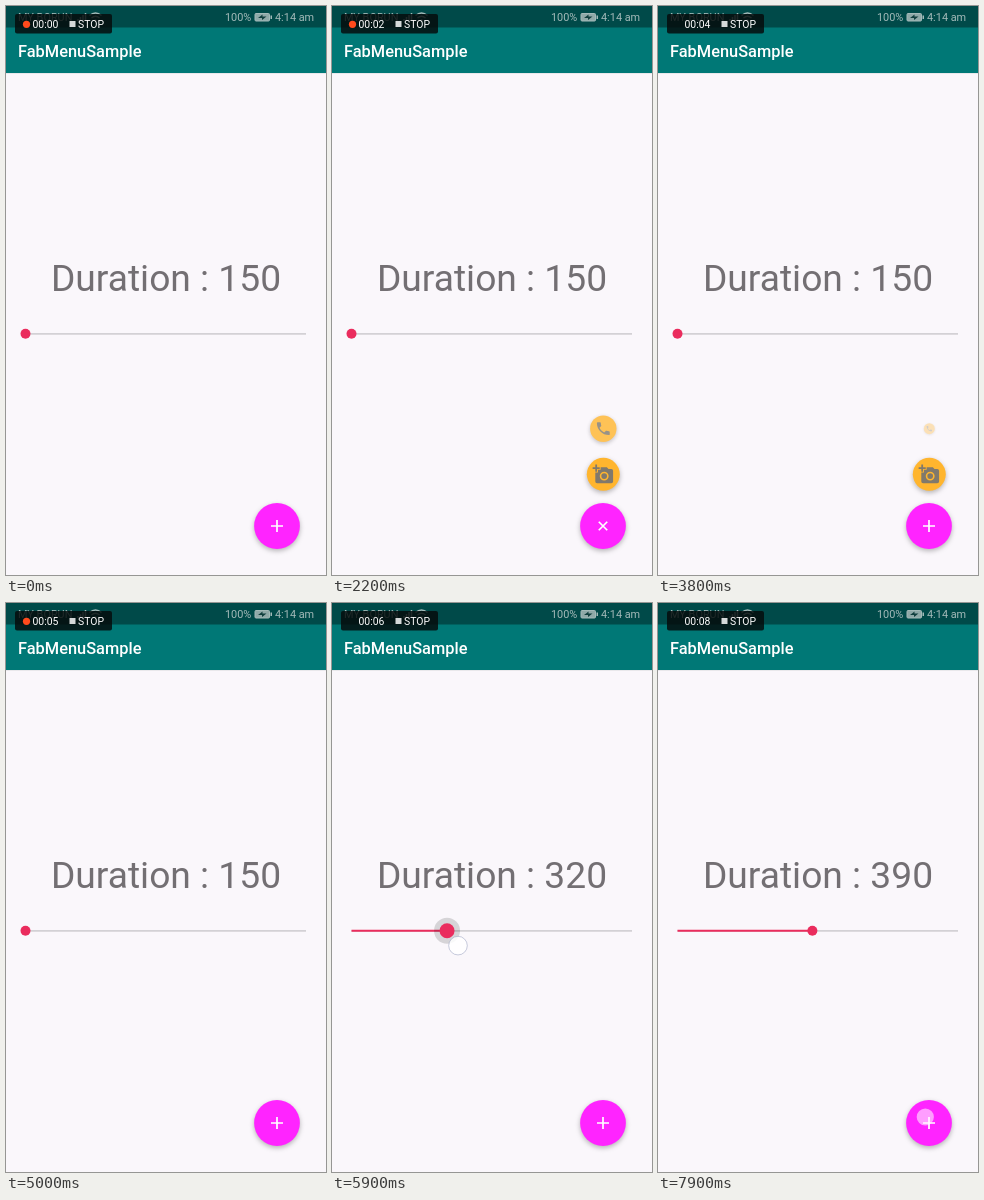
Animation, 320 px wide and 569 px high, one loop 8 s. Source, as an HTML page:

```html
<!DOCTYPE html>
<html lang="en">
<head>
<meta charset="utf-8">
<title>Fab menu</title>
<style>
  html, body { margin: 0; width: 100%; height: 100%; overflow: hidden; background: #faf7fb; }
  svg { display: block; width: 320px; height: 569px; font-family: Roboto, sans-serif; }
  .shadow { filter: drop-shadow(0 2.5px 2.5px rgba(0, 0, 0, .28)); }
  .status { fill: #a3bab9; font-size: 10.9px; }
  .rec { fill: #fff; font-size: 10.4px; }
  .icon { fill: #80796c; }
</style>
</head>
<body>
<svg viewBox="0 0 320 569">
  <rect width="320" height="569" fill="#faf7fb"/>
  <rect y="67" width="320" height="1" fill="#e9e8eb"/>
  <rect width="320" height="67" fill="#007876"/>
  <rect width="320" height="21.5" fill="#004a49"/>

  <text class="status" x="12" y="15">MY BORUN</text>
  <path d="M72 15v-2M74.5 15v-4M77 15v-6M79.500 15v-8" stroke="#a3bab9" stroke-width="1.5"/>
  <path d="M83.500 9.500q6-5 12 0M85.500 12q4-3.500 8 0" fill="none" stroke="#a3bab9" stroke-width="1.4"/>
  <circle cx="89.500" cy="14.500" r="1.2" fill="#a3bab9"/>
  <text class="status" x="219" y="15">100%</text>
  <rect x="249" y="7.500" width="14.500" height="7.500" rx="1" fill="#8fa9a8" stroke="#a3bab9"/>
  <rect x="264.500" y="9.500" width="1.500" height="3.500" fill="#a3bab9"/>
  <path d="M252 12l4.500-3.500v2h4L256 14v-2z" fill="#103f3e"/>
  <text class="status" x="269" y="15">4:14 am</text>

  <text x="12" y="51" font-size="16.4" font-weight="500" fill="#fff">FabMenuSample</text>

  <rect x="9" y="8" width="97" height="19.500" rx="2" fill="#060c0c" fill-opacity=".83"/>
  <circle id="dot" cx="20.500" cy="18.300" r="3.600" fill="#ff4a1c"/>
  <text id="clock" class="rec" x="26.500" y="22">00:00</text>
  <rect x="63.500" y="15" width="6" height="6" fill="#d5d9d9"/>
  <text class="rec" x="72" y="22">STOP</text>

  <text id="label" x="160" y="285" font-size="37.2" text-anchor="middle" fill="#736f73"></text>

  <path d="M19.500 327.800H300" stroke="#d3d1d5" stroke-width="1.800"/>
  <path id="track" stroke="#ea2c5d" stroke-width="1.900"/>
  <circle id="halo" cy="327.800" fill="#000" fill-opacity=".14"/>
  <circle id="thumb" cy="327.800" fill="#ea2c5d"/>

  <g class="mini">
    <circle class="shadow" r="16.500" fill="#ffb52e"/>
    <g class="icon" transform="scale(.889) translate(-12 -12)">
      <path fill-rule="evenodd" d="M3 4V1h2v3h3v2H5v3H3V6H0V4zM6 10V7h3V4h7l1.830 2H21a2 2 0 0 1 2 2v12a2 2 0 0 1-2 2H5a2 2 0 0 1-2-2V10zM8 14a5 5 0 0 0 10 0a5 5 0 0 0-10 0z"/>
      <circle cx="13" cy="14" r="3.200"/>
    </g>
  </g>
  <g class="mini">
    <circle class="shadow" r="16.500" fill="#ffb52e"/>
    <path class="icon" transform="scale(.889) translate(-12 -12)" d="M6.620 10.790c1.440 2.830 3.760 5.140 6.590 6.590l2.200-2.200c.27-.27.67-.36 1.020-.24 1.120.37 2.330.57 3.570.57.55 0 1 .45 1 1V20c0 .55-.45 1-1 1-9.390 0-17-7.610-17-17 0-.55.45-1 1-1h3.500c.55 0 1 .45 1 1 0 1.250.2 2.450.57 3.570.11.35.03.74-.25 1.020z"/>
  </g>
  <g class="mini">
    <circle class="shadow" r="16.500" fill="#ffb52e"/>
    <g fill="none" stroke="#80796c" stroke-width="2" transform="scale(.889) translate(-12 -12)">
      <path d="M3 17V3a1 1 0 0 1 1-1H16"/>
      <rect x="7" y="6" width="13" height="16" rx="1"/>
    </g>
  </g>

  <g transform="translate(271 520)">
    <circle class="shadow" r="22.900" fill="#ff24ff"/>
    <circle id="ripple" fill="#000" fill-opacity=".09"/>
    <path id="plus" d="M-6 0H6M0-6V6" stroke="#fff" stroke-width="1.700"/>
  </g>
  <circle id="touch" stroke="#9aa0c0"/>
</svg>
<script>
const LOOP = 8000, STEP = 100;
const $ = id => document.getElementById(id);
const set = (el, attrs) => { for (const k in attrs) el.setAttribute(k, attrs[k]); };
const minis = [...document.querySelectorAll('.mini')];

// Linear interpolation over [time, value] pairs.
function at(keys, t) {
  if (t <= keys[0][0]) return keys[0][1];
  for (let i = 1; i < keys.length; i++) {
    const [t0, a] = keys[i - 1], [t1, b] = keys[i];
    if (t < t1) return a + (b - a) * (t - t0) / (t1 - t0);
  }
  return keys[keys.length - 1][1];
}

const fingerX = [[5100, 20], [5200, 26], [5400, 68], [5500, 87], [5600, 95],
                 [5900, 126], [6200, 146], [6300, 151.500], [6400, 151.500], [6500, 154.400]];
const fingerY = [[5100, 334], [5600, 340], [6400, 347], [6700, 348]];
const press = [[5000, 0], [5200, 1], [6800, 1], [7000, 0]];
const turn = [[1900, 0], [2100, 45], [3500, 45], [3700, 0]];
const ripple = [[1700, 0], [1900, 16], [2100, 23], [2200, 0],
                [3200, 0], [3400, 19], [3500, 23], [3700, 23], [3800, 0]];

// Start of opening and closing, nearest button first.
const openAt = [1970, 2080, 2320], closeAt = [3850, 3700, 3550], POP = 150;

const taps = [
  { from: 1800, to: 2000, x: 274.500, y: 522 },
  { from: 3300, to: 3600, x: 270.500, y: 525.500 },
  { from: 7900, to: 8000, x: 267.300, y: 514 }
];

function drawTouch(t) {
  const tap = taps.find(p => t >= p.from && t < p.to);
  const drag = t >= 5100 && t < 6800;
  set($('touch'), {
    visibility: tap || drag ? 'visible' : 'hidden',
    cx: tap ? tap.x : at(fingerX, t),
    cy: tap ? tap.y : at(fingerY, t),
    r: tap ? 8.600 : 9.300,
    fill: tap ? '#fff5ff' : '#fff',
    'fill-opacity': tap ? .58 : .85,
    'stroke-opacity': tap ? 0 : .55
  });
}

function drawSlider(t) {
  const raw = 150 + (at(fingerX, t - STEP) - 19.500) / .562;
  const value = t < 5200 ? 150 : Math.round(raw / 5) * 5;
  const x = 19.500 + (value - 150) * .562, p = at(press, t);
  $('label').textContent = 'Duration : ' + value;
  set($('track'), { d: `M19.500 327.800H${x}` });
  set($('halo'), { cx: x, r: 13 * p });
  set($('thumb'), { cx: x, r: 5 + 2.500 * p });
}

function drawMenu(t) {
  minis.forEach((el, i) => {
    const a = openAt[i], b = closeAt[i];
    const s = at([[a, 0], [a + POP, 1], [b, 1], [b + POP, 0]], t);
    set(el, {
      transform: `translate(271.300 ${468.300 - 45.600 * i}) scale(${s})`,
      opacity: s,
      visibility: s > 0 ? 'visible' : 'hidden'
    });
  });
  set($('plus'), { transform: `rotate(${at(turn, t)})` });
  set($('ripple'), { r: at(ripple, t) });
}

function drawRecorder(t) {
  const elapsed = t + (t < 1000 ? 600 : 500);
  $('clock').textContent = '00:0' + Math.floor(elapsed / 1000);
  set($('dot'), { visibility: elapsed % 1000 >= 500 ? 'visible' : 'hidden' });
}

function render(now) {
  const t = Math.floor((now - start) % LOOP / STEP) * STEP;
  drawRecorder(t);
  drawSlider(t);
  drawMenu(t);
  drawTouch(t);
}

const start = performance.now();
function tick() {
  render(performance.now());
  requestAnimationFrame(tick);
}
tick();
</script>
</body>
</html>
```
